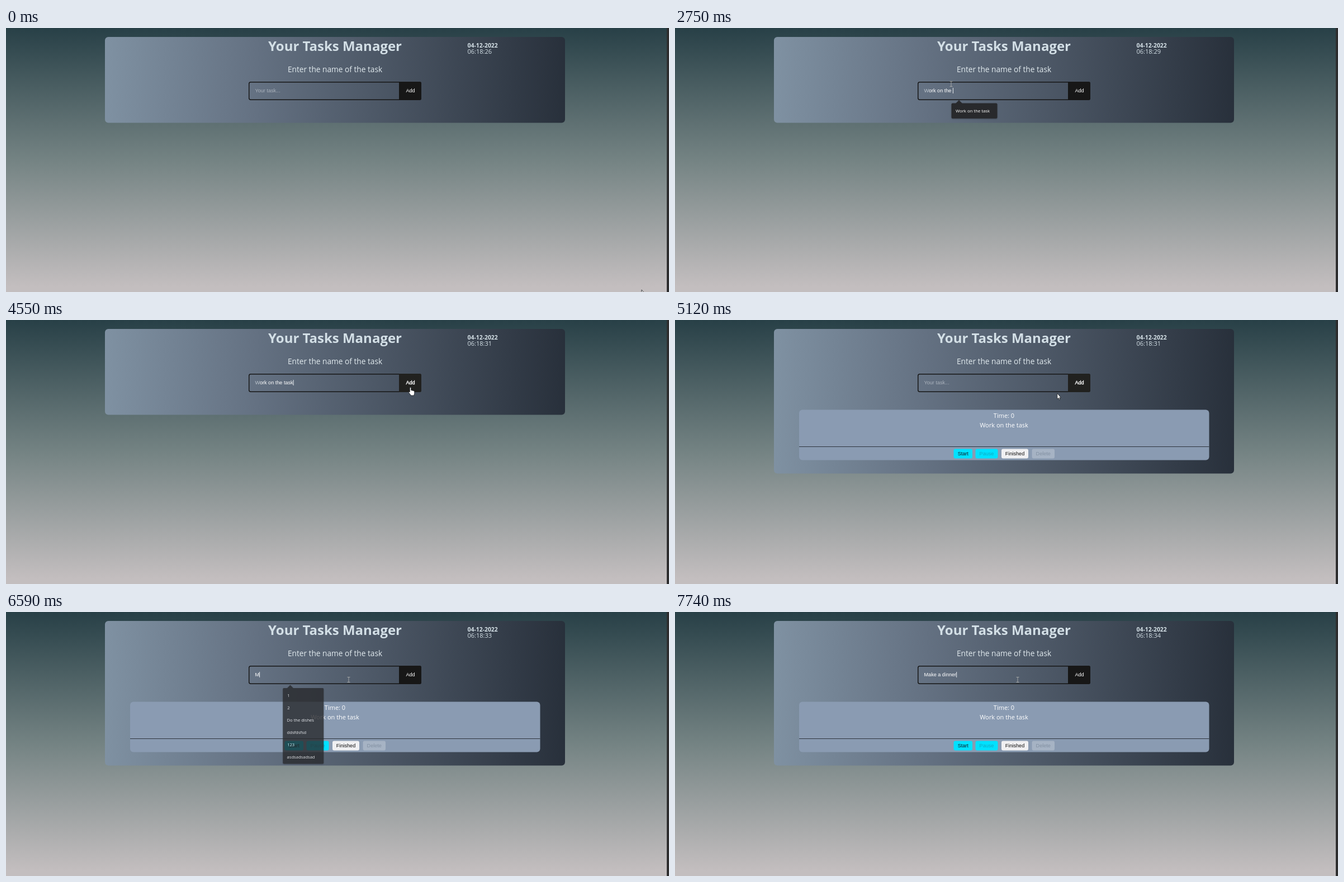
An HTML page for the animation above (8 s loop, 1186x472 px).

```html
<!DOCTYPE html>
<html lang="en">
<head>
<meta charset="utf-8">
<title>Tasks</title>
<style>
html, body { margin: 0; width: 100%; height: 100%; overflow: hidden; }
svg { display: block; width: 1186px; height: 472px;
  background: linear-gradient(#284047, #748383 50%, #c3bebf 98%); }
text { font: 11px "Open Sans", sans-serif; fill: #fff; white-space: pre; }
text.ui { font: 9.1px "Liberation Sans", Arial, sans-serif; }
.mid { text-anchor: middle; }
.popup text { font-size: 7.75px; }
.popup { filter: drop-shadow(0 1px 1px rgba(0, 0, 0, .25)); }
</style>
</head>
<body>
<svg viewBox="0 0 1186 472">
  <defs>
    <linearGradient id="slate">
      <stop offset="0" stop-color="#7f91a2"/>
      <stop offset=".33" stop-color="#647182"/>
      <stop offset="1" stop-color="#28303b"/>
    </linearGradient>
  </defs>
  <rect x="1182" width="4" height="472" fill="#2d2d2e"/>
  <rect id="panel" x="177" y="16" width="823" height="153.5" rx="6" fill="url(#slate)"/>
  <text class="mid" x="588.5" y="41.2" style="font-size:24px;font-weight:700;fill:#d3dfe6">Your Tasks Manager</text>
  <text class="mid" x="588.5" y="79" style="font-size:13.7px;fill:#e2ebef">Enter the name of the task</text>
  <text x="825.6" y="35.2" style="font-size:10.4px;font-weight:700;fill:#d5e1e7">04-12-2022</text>
  <text id="clock" x="825.5" y="46.4" style="fill:#d5e1e7"></text>

  <rect x="434.75" y="96.75" width="307.5" height="31.5" rx="3" fill="none" stroke="#161616" stroke-width="1.5"/>
  <path id="add" d="M703 96H740a3 3 0 0 1 3 3V126a3 3 0 0 1-3 3H703Z"/>
  <text id="addLabel" class="ui mid" x="723.5" y="115.3">Add</text>
  <text id="hint" class="ui" x="445.5" y="115.3" style="fill:#aab2bc">Your task...</text>
  <text class="ui" x="445.5" y="115.3" id="field"><tspan id="first"></tspan><tspan id="rest"></tspan></text>
  <rect id="caret" y="107" width="1" height="10" fill="#e8ecf0"/>

  <g id="card">
    <rect x="222" y="160.5" width="733.5" height="90" rx="6" fill="#8a9bb2"/>
    <rect x="222" y="226" width="733.5" height="1" fill="#2e353e"/>
    <text class="mid" x="588.5" y="175.2">Time: 0</text>
    <text class="mid" x="588.5" y="192.4">Work on the task</text>
  </g>
  <g id="popups"></g>
  <path id="cursor"/>
</svg>
<script>
const LOOP = 8000;
const $ = id => document.getElementById(id);
const show = (el, on) => el.setAttribute('visibility', on ? 'visible' : 'hidden');
const clamp = v => Math.max(0, Math.min(1, v));
const between = (t, a, b) => t >= a && t < b;

function put(parent, tag, attrs, text = '') {
  const el = document.createElementNS('http://www.w3.org/2000/svg', tag);
  for (const k in attrs) el.setAttribute(k, attrs[k]);
  el.textContent = text;
  return parent.appendChild(el);
}

// Task buttons: label, left, width, background, text colour
for (const [label, x, width, fill, ink] of [
  ['Start', 498.5, 33.5, '#00e1ff', '#101820'],
  ['Pause', 537.5, 40, '#00e1ff', '#12a9c0'],
  ['Finished', 584, 48, '#f0f0f2', '#101010'],
  ['Delete', 638.5, 40.5, '#a6b3c4', '#8290a2']
]) {
  put($('card'), 'rect', { x, y: 230.5, width, height: 17, rx: 3, fill });
  put($('card'), 'text', { x: x + width / 2, y: 242.2, class: 'ui mid', style: 'fill:' + ink }, label);
}

function popup(width, height, rx, items) {
  const g = put($('popups'), 'g', { class: 'popup' });
  put(g, 'rect', { x: 494.5, y: 134.5, width, height, rx, fill: '#28292c' });
  put(g, 'path', { d: 'M502 135L508 129L514 135Z', fill: '#28292c' });
  items.forEach((s, i) => put(g, 'text', { x: s.length < 4 ? 502.6 : 502, y: 151 + i * 22.4 }, s));
  return g;
}
const list = popup(74.5, 138.5, 2, ['1', '2', 'Do the dishes', 'ddsfdsfsd', '123', 'asdsadsadsad']);
const short = popup(74.5, 30.5, 0, ['1']);
const match = popup(82, 27.3, 2, ['Work on the task']);

function fade(el, k, cy) {
  const s = .9 + .1 * k;
  show(el, k > 0);
  el.setAttribute('opacity', k);
  el.setAttribute('transform', `translate(531.5 ${cy}) scale(${s}) translate(-531.5 ${-cy})`);
}

const entries = [
  { text: 'Work on the task', focus: 520, blur: 4770, clear: 4930, tint: '#bcc5ce',
    keys: [920, 1250, 1360, 1480, 1630, 1890, 2060, 2220, 2420, 2520, 2610, 2750, 2880, 2980, 3140, 3340] },
  { text: 'Make a dinner', focus: 5860, blur: LOOP, clear: LOOP, tint: '#fff',
    keys: [6550, 6750, 6830, 6900, 6960, 7030, 7100, 7180, 7250, 7410, 7510, 7620, 7740] }
];
const ticks = [620, 1680, 2680, 3590, 4530, 5650, 6560, 7650];

// Pointer track: time, x, y
const track = [
  [30, 1137, 468], [130, 1040, 405], [330, 620, 170], [480, 494, 100],
  [4040, 494, 100], [4230, 600, 140], [4470, 722, 126], [4550, 723.5, 120.5],
  [4770, 724, 118], [4960, 724, 118], [5120, 684, 131], [5400, 625, 127], [5700, 613, 121]
];
const shapes = {
  arrow: ['M0 0V10.4L2.2 8.4L3.7 11.8L5.2 11.1L3.8 7.9H6.6Z', '#fff', '#15181c'],
  hand: ['M0 0Q1.2 0 1.2 1.2V5L5.7 6Q7.2 6.4 7.2 8V11L6.2 14.5H1L-3 9Q-3.5 7.5-2 7.5L-1.2 8.5V1.2Q-1.2 0 0 0Z', '#fff', '#15181c'],
  beam: ['M-2.5-4.5H2.5M0-4.5V4.5M-2.5 4.5H2.5', 'none', '#b5b6b3']
};

function pointer(t) {
  const i = track.findIndex(p => p[0] > t);
  if (i <= 0) return (i ? track[track.length - 1] : track[0]).slice(1);
  const [a, b] = [track[i - 1], track[i]];
  const k = (t - a[0]) / (b[0] - a[0]);
  return [a[1] + (b[1] - a[1]) * k, a[2] + (b[2] - a[2]) * k];
}

function draw(t) {
  $('clock').textContent = '06:18:' + (26 + ticks.filter(x => x <= t).length);

  const added = t >= 4930;
  show($('card'), added);
  $('panel').setAttribute('height', added ? 258.5 : 153.5);

  const e = entries[added ? 1 : 0];
  const count = e.keys.filter(x => x <= t).length;
  $('first').textContent = e.text.slice(0, Math.min(count, 1));
  $('first').style.fill = e.tint;
  $('rest').textContent = e.text.slice(1, Math.max(count, 1));
  show($('hint'), !count);

  const last = count ? e.keys[count - 1] : e.focus;
  show($('caret'), between(t, e.focus, e.blur) && (t - last) % 1000 < 500);
  $('caret').setAttribute('x', 445.5 + (count ? $('field').getComputedTextLength() : 0));

  const opening = t < 920 ? (t - 520) / 100 : added ? (t - 5880) / 180 : 0;
  fade(list, Math.min(clamp(opening), clamp((6750 - t) / 200)), 203.5);
  show(short, between(t, 920, 950));
  fade(match, t >= 950 ? clamp((3580 - t) / 200) : 0, 148);

  const hover = between(t, 4450, 5150);
  $('add').setAttribute('fill', hover ? '#21211f' : '#171717');
  $('addLabel').setAttribute('stroke', hover ? '#fff' : 'none');
  $('addLabel').setAttribute('stroke-width', .4);

  const [x, y] = pointer(t);
  const inRow = between(y, 96, 129);
  const kind = inRow && between(x, 434, 703) ? 'beam' : inRow && between(x, 703, 743) ? 'hand' : 'arrow';
  const [d, fill, stroke] = shapes[kind];
  const attrs = { d, fill, stroke, 'stroke-width': .8, transform: `translate(${x} ${y})` };
  for (const k in attrs) $('cursor').setAttribute(k, attrs[k]);
}

const start = performance.now();
function loop() {
  draw((performance.now() - start) % LOOP);
  requestAnimationFrame(loop);
}
loop();
</script>
</body>
</html>
```
